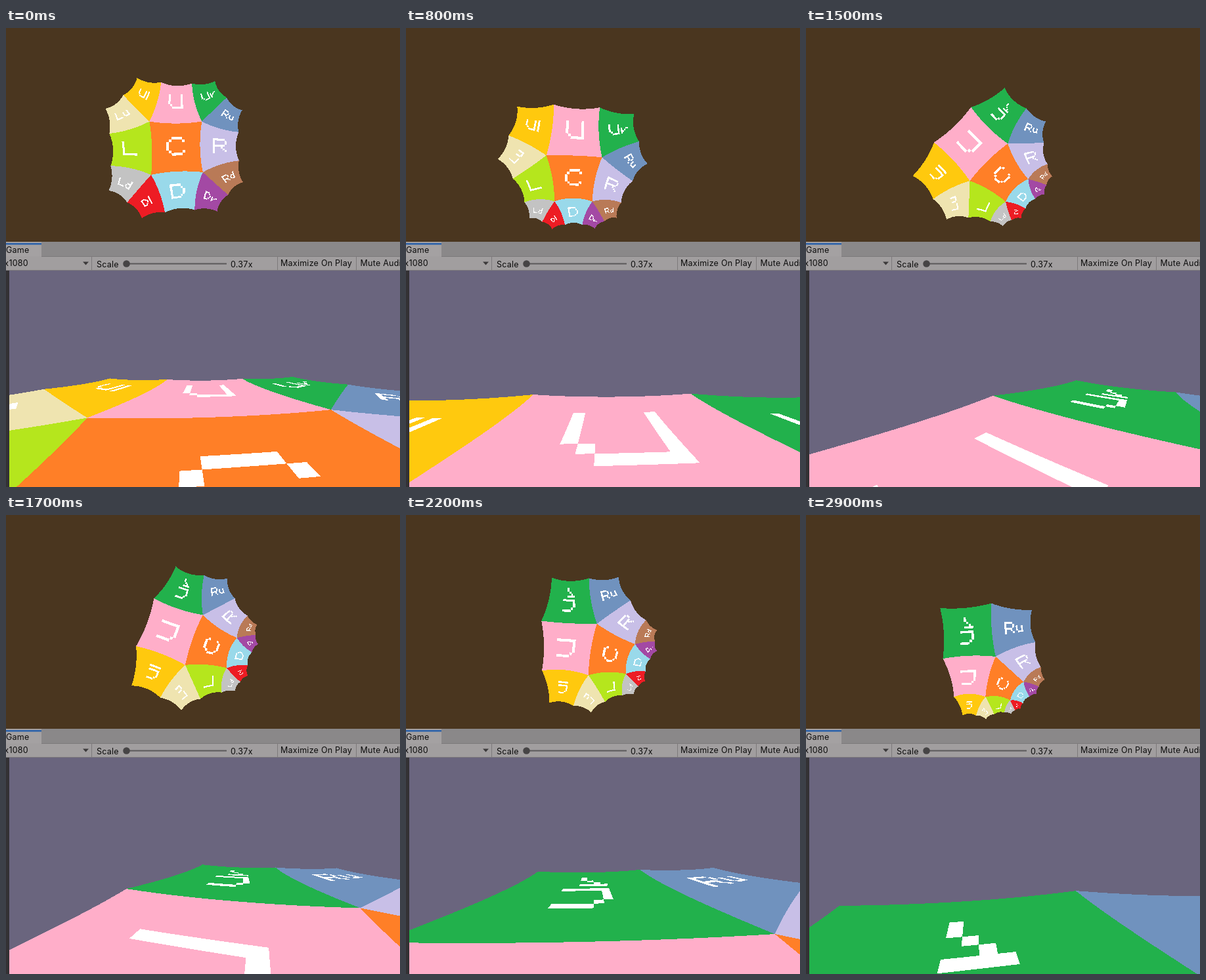
Write an HTML page that moves like this. It is 600 by 700 pixels and loops after 6.9 s.

```html
<!DOCTYPE html>
<html lang="en">
<head>
<meta charset="utf-8">
<title>Hyperbolic tiles</title>
<style>
  html, body { margin: 0; width: 100%; height: 100%; overflow: hidden; background: #4a361f; }
  #stage { display: block; width: 600px; height: 700px; }
  text { font: 12.5px Inter, "Open Sans", sans-serif; letter-spacing: 0.25px; fill: #0c0c0c; }
</style>
</head>
<body>
<svg id="stage" viewBox="0 0 600 700">
  <rect width="600" height="327" fill="#4a361f"/>
  <g id="map" shape-rendering="crispEdges"></g>
  <rect y="326" width="600" height="23" fill="#8a8889"/>
  <rect y="326" width="54" height="23" fill="#a4a1a2"/>
  <rect y="328" width="54" height="2.5" fill="#2b62ab"/>
  <rect y="348" width="600" height="22" fill="#a19e9f"/>
  <path d="M54 348.5H600M0 369.5H600M130.5 349V369M413.5 349V369M533.5 349V369" stroke="#7c797b"/>
  <path d="M117 356.5h9l-4.5 5z" fill="#3c3a3b"/>
  <path d="M183 359.5H336" stroke="#5b595a" stroke-width="2"/>
  <circle cx="183.500" cy="359.500" r="5.300" fill="#464445"/>
  <text x="0" y="343">Game</text>
  <text x="34" y="363" text-anchor="end">x1080</text>
  <text x="138" y="365">Scale</text>
  <text x="342" y="365">0.37x</text>
  <text x="418" y="363">Maximize On Play</text>
  <text x="539.500" y="363">Mute Audio</text>
  <rect y="370" width="600" height="330" fill="#333134"/>
  <svg x="5" y="370" width="595" height="330" viewBox="5 370 595 330">
    <rect x="5" y="370" width="595" height="330" fill="#6a657e"/>
    <g id="ground" shape-rendering="crispEdges"></g>
  </svg>
</svg>
<script>
// Order-5 square tiling in the Poincaré disc, seen from above and in perspective.
const DISC = { x: 253, y: 181, r: 141.5 };
const STEP = 0.4858;        // disc distance between neighbouring tile centres
const HALF_SIDE = 0.4859;   // half a tile side in the Klein model
const LOOP = 6900, TICK = 100, LAST = 2900;

const DIRS = { U: [0, -STEP], D: [0, STEP], L: [-STEP, 0], R: [STEP, 0] };
const COLORS = {
  C: '#ff7f27', U: '#ffaec9', D: '#99d9ea', L: '#b5e61d', R: '#c8bfe7',
  Ul: '#ffc90e', Ur: '#22b14c', Lu: '#efe4b0', Ld: '#c3c3c3',
  Ru: '#7092be', Rd: '#b97a57', Dl: '#ed1c24', Dr: '#a349a4'
};
// Pixel lettering: cells per tile side, offset in cells, glyph rows.
const BIG = {
  cells: 17, dx: -0.25, dy: -0.5,
  glyphs: {
    C: '..XXXX./.X....X/X/X/X/.X....X/..XXXX.',
    U: 'X.....X/X.....X/X.....X/X.....X/X.....X/.X....X/..XXXXX',
    L: 'X/X/X/X/X/X/XXXXXXX',
    R: 'XXXXXX./X.....X/X.....X/XXXXXX./X...X../X....X./X.....X',
    D: 'XXXXX../X....X./X.....X/X.....X/X.....X/X....X./XXXXX..'
  }
};
const SMALL = {
  cells: 20, dx: 0.4, dy: -0.3,
  glyphs: {
    U: 'X....X/X....X/X....X/X....X/.X...X/..XXXX',
    L: 'X/X/X/X/X/XXXXX',
    R: 'XXXX./X...X/X...X/XXXX./X..X./X...X',
    D: 'XXX../X..X./X...X/X...X/X..X./XXX..',
    l: 'X/X/X/X/X/X',
    r: '//X..XX/X.X../XX.../X....',
    u: '//X..X/X..X/X..X/.XXX',
    d: '...X/...X/.XXX/X..X/X..X/.XXX'
  }
};

// time, centre of tile U in the disc, turn of tile U
const POSES = [
  [0, 0.043, -0.478, 0.018],
  [200, 0.046, -0.437, 0.03],
  [400, 0.047, -0.352, 0.047],
  [800, 0.0365, -0.167, 0.05],
  [1100, 0.024, -0.042, 0.05],
  [1200, 0.023, -0.037, 0],
  [1500, -0.016, -0.034, -0.769],
  [1800, -0.0336, -0.0245, -1.45],
  [2000, -0.0495, 0.047, -1.487],
  [2500, -0.059, 0.305, -1.508],
  [2800, -0.035, 0.439, -1.58],
  [2900, -0.029, 0.468, -1.59]
];

// (z + c) / (1 + conj(c) z)
function shift([x, y], [a, b]) {
  const nx = x + a, ny = y + b;
  const dx = 1 + a * x + b * y, dy = a * y - b * x;
  const n = dx * dx + dy * dy;
  return [(nx * dx + ny * dy) / n, (ny * dx - nx * dy) / n];
}

function rotate([x, y], angle) {
  const c = Math.cos(angle), s = Math.sin(angle);
  return [x * c - y * s, x * s + y * c];
}

// Tile coordinates -1..1 to the disc, tile centred.
function toDisc(u, v) {
  const x = u * HALF_SIDE, y = v * HALF_SIDE;
  const k = 1 + Math.sqrt(1 - x * x - y * y);
  return [x / k, y / k];
}

// Outline of a rectangle, each side cut into n parts.
function outline(x0, y0, x1, y1, n) {
  const corners = [[x0, y0], [x1, y0], [x1, y1], [x0, y1]];
  return corners.flatMap(([x, y], i) => {
    const [ex, ey] = corners[(i + 1) % 4];
    return Array.from({ length: n }, (_, k) =>
      toDisc(x + (ex - x) * k / n, y + (ey - y) * k / n));
  });
}

function labelCells(name) {
  const font = name.length > 1 ? SMALL : BIG;
  const glyphs = [...name].map(ch => font.glyphs[ch].split('/'));
  const widths = glyphs.map(rows => Math.max(...rows.map(r => r.length)));
  const total = widths.reduce((a, b) => a + b) + glyphs.length - 1;
  const at = n => n * 2 / font.cells - 1;
  const top = (font.cells - glyphs[0].length) / 2 + font.dy;
  let left = (font.cells - total) / 2 + font.dx;
  const cells = [];
  glyphs.forEach((rows, i) => {
    rows.forEach((row, r) => [...row].forEach((ch, c) => {
      if (ch === 'X')
        cells.push(outline(at(left + c), at(top + r), at(left + c + 1), at(top + r + 1), 1));
    }));
    left += widths[i] + 1;
  });
  return cells;
}

function makePath(parent, fill) {
  const path = document.createElementNS('http://www.w3.org/2000/svg', 'path');
  path.setAttribute('fill', fill);
  return document.getElementById(parent).appendChild(path);
}

const tiles = Object.keys(COLORS).map(name => {
  const moves = name === 'C' ? [] : [...name.toUpperCase()].map(ch => DIRS[ch]).reverse();
  moves.push(DIRS.D);   // coordinates are relative to tile U
  const place = shape => shape.map(p => moves.reduce(shift, p));
  const paths = id => [makePath(id, COLORS[name]), makePath(id, '#fff')];
  return {
    shapes: [[place(outline(-1, -1, 1, 1, 14))], labelCells(name).map(place)],
    map: paths('map'),
    ground: paths('ground')
  };
});

const depth = ([x, y]) => 207 - y + 0.09 * (x - 258);

function project(p) {
  const z = depth(p);
  return [305 + 300 * (p[0] - 268 + 0.09 * p[1]) / z, 478 + 7090 / z];
}

// Keeps the part of a polygon in front of the camera.
function clipNear(points, near = 8) {
  const kept = [];
  points.forEach((a, i) => {
    const b = points[(i + 1) % points.length];
    const da = depth(a) - near, db = depth(b) - near;
    if (da >= 0) kept.push(a);
    if (da * db < 0) {
      const k = da / (da - db);
      kept.push([a[0] + (b[0] - a[0]) * k, a[1] + (b[1] - a[1]) * k]);
    }
  });
  return kept;
}

const toPath = polygons => polygons.filter(p => p.length > 2)
  .map(p => 'M' + p.map(q => q[0].toFixed(2) + ' ' + q[1].toFixed(2)).join('L') + 'Z').join('');

function poseAt(time) {
  const next = POSES.findIndex(p => p[0] > time);
  if (next < 0) return POSES[POSES.length - 1];
  const a = POSES[next - 1], b = POSES[next];
  const k = (time - a[0]) / (b[0] - a[0]);
  return a.map((v, i) => v + (b[i] - v) * k);
}

function draw(time) {
  const [, x, y, turn] = poseAt(time);
  const move = p => {
    const q = shift(rotate(p, turn), [x, y]);
    return [DISC.x + DISC.r * q[0], DISC.y + DISC.r * q[1]];
  };
  for (const tile of tiles) {
    tile.shapes.forEach((shape, i) => {
      const flat = shape.map(poly => poly.map(move));
      tile.map[i].setAttribute('d', toPath(flat));
      tile.ground[i].setAttribute('d', toPath(flat.map(poly => clipNear(poly).map(project))));
    });
  }
}

const start = performance.now();
let shown = -1;
function frame() {
  const time = (performance.now() - start) % LOOP;
  const tick = Math.min(Math.floor(time / TICK) * TICK, LAST);
  if (tick !== shown) draw(shown = tick);
  requestAnimationFrame(frame);
}
frame();
</script>
</body>
</html>
```
